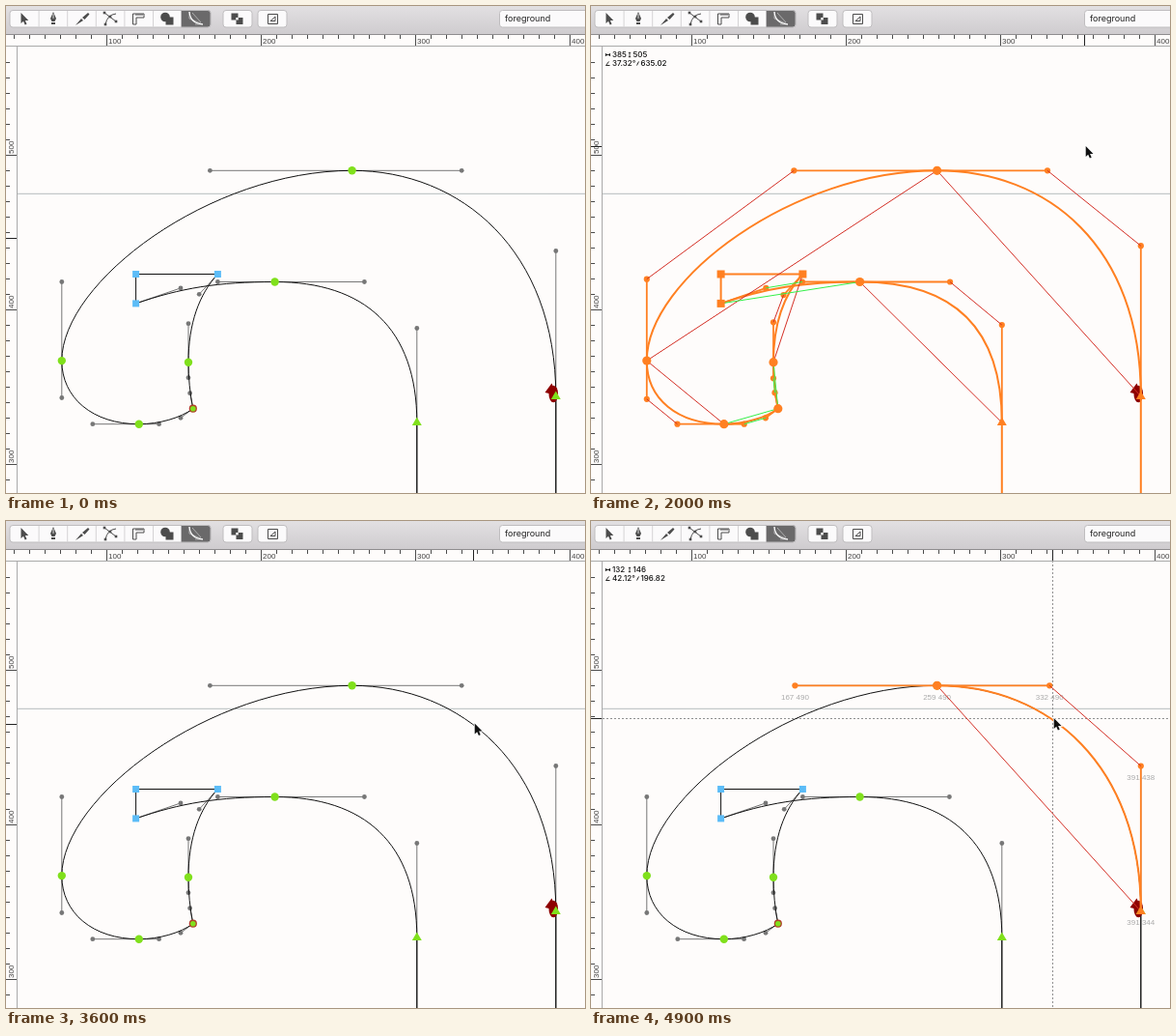
Recreate the animation shown at these times as an HTML page with a canvas. Size 600 px wide and 504 px high, loop 5000 ms.

```html
<!DOCTYPE html>
<html lang="en">
<head>
<meta charset="utf-8">
<title>Curve editing</title>
<style>
html, body { margin: 0; width: 100%; height: 100%; overflow: hidden; background: #fefcfb; }
canvas { display: block; }
</style>
</head>
<body>
<canvas id="stage" width="600" height="504"></canvas>
<script>
const ctx = document.getElementById('stage').getContext('2d');
const W = 600, H = 504, LOOP = 5000, STEP = 100, TAU = Math.PI * 2;
const PAPER = '#fefcfb', INK = '#4c4c4c';
const ORANGE = '#ff8022', RED = '#d42f25', LIME = '#35f04a', GREEN = '#80e01c', BLUE = '#5cbcf7';
const SMALL = '8px "Liberation Sans", Arial, sans-serif';
const UI = 'Inter, "Liberation Sans", sans-serif';

// Glyph units to pixels
const ZOOM = 1.6;
const X = u => u * ZOOM - 55.8;
const Y = v => (490 - v) * ZOOM + 170.3;
const P = (u, v) => [X(u), Y(v)];
const snap = n => Math.floor(n) + 0.5;

const START = P(391, 344), TOP = P(259, 490), LEFT = P(71, 367), LOW = P(121, 326);
const TIP = P(156, 336), INNER = P(153, 366), ARCH = P(209, 418), STEM = P(301, 327);
const CORNERS = [P(172, 423), P(119, 423), P(119, 404)];
const ROUND = [TOP, LEFT, LOW, INNER, ARCH];

// Curve from a point with a horizontal handle to one with a vertical handle
function quarter(a, b, la, lb) {
  const sx = Math.sign(b[0] - a[0]) * ZOOM, sy = Math.sign(a[1] - b[1]) * ZOOM;
  return { pts: [a, [a[0] + sx * la, a[1]], [b[0], b[1] + sy * lb], b], tint: RED };
}
const free = (a, b, c, d, tint) => ({ pts: [a, b, c, d], tint });

const CURVES = [
  quarter(TOP, START, 71, 94),
  quarter(TOP, LEFT, 92, 51),
  quarter(LOW, LEFT, 30, 24),
  quarter(ARCH, STEM, 58, 61),
  free(LOW, P(134, 326), P(148, 330), TIP, LIME),
  free(TIP, P(154, 346), P(153, 356), INNER, LIME),
  free(INNER, P(153, 391), P(160, 410), CORNERS[0], RED),
  free(CORNERS[2], P(148, 414), P(172, 418), ARCH, LIME)
];

// Pointer stops, eased in between
const STOPS = [
  { t: 0, at: [606, 240] },
  { t: 700, at: [565, 404] },
  { t: 900, at: [513, 200] },
  { t: 1500, at: [507, 168] },
  { t: 2500, at: [516, 123] },
  { t: 3600, at: [484.5, 210] },
  { t: 4200, at: [475, 205] },
  { t: 4900, at: [478.5, 204.5] }
];
const PULL = STOPS[3], TUG = STOPS[6];
const ease = k => k * k * (3 - 2 * k);

function pointer(t) {
  const i = STOPS.findIndex(s => s.t >= t);
  if (i < 1) return STOPS[i < 0 ? STOPS.length - 1 : 0].at;
  const a = STOPS[i - 1], b = STOPS[i], k = ease((t - a.t) / (b.t - a.t));
  return a.at.map((n, j) => n + (b.at[j] - n) * k);
}

function line(pts, color, width = 1) {
  ctx.beginPath();
  pts.forEach(p => ctx.lineTo(...p));
  ctx.strokeStyle = color;
  ctx.lineWidth = width;
  ctx.stroke();
}

function dot([x, y], r, fill) {
  ctx.beginPath();
  ctx.arc(x, y, r, 0, TAU);
  ctx.fillStyle = fill;
  ctx.fill();
}

function square([x, y], size, fill) {
  ctx.fillStyle = fill;
  ctx.fillRect(x - size / 2, y - size / 2, size, size);
}

function fillPath(d, color) {
  ctx.fillStyle = color;
  ctx.fill(new Path2D(d));
}

function strokePath(d, color, width = 1) {
  ctx.strokeStyle = color;
  ctx.lineWidth = width;
  ctx.stroke(new Path2D(d));
}

const triangle = ([x, y], fill) => fillPath(`M${x - 5} ${y + 3}l5 -8.5l5 8.5z`, fill);

function text(str, x, y, font, color, align = 'left') {
  ctx.font = font;
  ctx.fillStyle = color;
  ctx.textAlign = align;
  ctx.fillText(str, x, y);
}

function bezier([a, b, c, d], color, width) {
  ctx.beginPath();
  ctx.moveTo(...a);
  ctx.bezierCurveTo(...b, ...c, ...d);
  ctx.strokeStyle = color;
  ctx.lineWidth = width;
  ctx.stroke();
}

function box(x, w, fill = '#fbfafb', r = 3) {
  ctx.beginPath();
  ctx.roundRect(x, 4.5, w, 17.5, r);
  ctx.fillStyle = fill;
  ctx.fill();
  ctx.strokeStyle = '#bfbdbf';
  ctx.lineWidth = 1;
  ctx.stroke();
}

function arrow(x, y, fill, edge) {
  const d = `M${x} ${y}v11l2.5 -2.2l1.7 3.8l1.8 -.8l-1.6 -3.8h3.4z`;
  if (edge) strokePath(d, edge, 1.6);
  fillPath(d, fill);
}

function icons() {
  arrow(15.5, 7, INK);
  // pen and knife
  fillPath('M49 6l3 7l-1.5 3h-3l-1.5 -3zM47 17h4v2h-4z', INK);
  strokePath('M49 8v5', '#fff', 0.8);
  fillPath('M72 20l6 -7l2 2zM79 12l6 -5l1.5 1.5l-5 5.5z', INK);
  // points and ruler
  strokePath('M103 19q2 -10 11 -11M102 7l12 9', INK);
  for (const p of [[102, 7], [108, 11], [114, 16], [103, 19]]) square(p, 2.6, INK);
  strokePath('M131.5 19v-11h11.5v4h-8v7zM135 8v2M137 8v2M139 8v2M141 8v2', INK);
  // union and active tool
  dot([165, 11.5], 4.8, INK);
  square([169.5, 15.5], 8, INK);
  strokePath('M190 6v7l14 6h-8M193 7l9 10', '#ccc', 0.7);
  strokePath('M190 6q1 12 14 13', '#fff', 1.2);
  // overlap and export
  square([237, 11], 7, INK);
  square([242, 15.5], 7, INK);
  square([239.5, 13.2], 2.5, '#fff');
  strokePath('M271.5 8.5h10v10h-10zM274 15.5h5v-4.5z', INK);
}

function toolbar() {
  const g = ctx.createLinearGradient(0, 0, 0, 29);
  g.addColorStop(0, '#e2e0e2');
  g.addColorStop(1, '#cfcccf');
  ctx.fillStyle = g;
  ctx.fillRect(0, 0, W, 29);
  ctx.fillStyle = '#8f8d8f';
  ctx.fillRect(0, 29, W, 1);
  box(4, 208);
  for (let i = 1; i < 6; i++) line([[4.5 + i * 29.6, 5], [4.5 + i * 29.6, 22]], '#d5d3d5');
  box(181.5, 30.5, '#6a696a', [0, 3, 3, 0]);
  box(225, 30);
  box(261, 30);
  box(511.5, 100);
  text('foreground', 517, 16.3, '9px ' + UI, '#222');
  icons();
}

function rulers([x, y]) {
  ctx.fillStyle = PAPER;
  ctx.fillRect(0, 30, W, 11);
  ctx.fillRect(0, 30, 11, H);
  line([[0, 41.5], [W, 41.5]], '#aaa');
  line([[11.5, 41], [11.5, H]], '#aaa');
  for (let u = 40; u < 580; u += 10) {
    const major = u % 100 === 0, px = snap(X(u)), py = snap(Y(u));
    line([[px, 30], [px, major ? 41 : 34]], INK);
    if (major) text(u, px + 1.5, 39, SMALL, '#444');
    if (py < 44) continue;
    line([[0, py], [major ? 11 : 4, py]], INK);
    if (!major) continue;
    ctx.save();
    ctx.translate(8, py - 1.5);
    ctx.rotate(-TAU / 4);
    text(u, 0, 0, SMALL, '#444');
    ctx.restore();
  }
  line([[snap(x), 30], [snap(x), 41]], '#222');
  line([[0, snap(y)], [11, snap(y)]], '#222');
}

// Dragging scales horizontal handles by dx and vertical ones by dy
function stretch(on, off, dx, dy) {
  const vx = off[0] - on[0], vy = off[1] - on[1];
  const k = 1 + 0.0075 * (Math.abs(vx) > Math.abs(vy) ? dx : dy);
  return [on[0] + vx * k, on[1] + vy * k];
}

function pulled({ pts: [a, b, c, d], tint }, dx, dy) {
  return free(a, stretch(a, b, dx, dy), stretch(d, c, dx, dy), d, tint);
}

function handles({ pts: [a, b, c, d] }, color, width, r) {
  line([a, b], color, width);
  line([c, d], color, width);
  dot(b, r, color);
  dot(c, r, color);
}

function tension({ pts: [a, b, c, d], tint }) {
  line([a, d], tint);
  line([b, c], tint);
}

function startMark() {
  fillPath('M565.5 390.5l-7 9.5l12.5 3z', '#8e0000');
  ctx.beginPath();
  ctx.ellipse(567.3, 401.5, 4.8, 8.7, 0, 0, TAU);
  ctx.fill();
}

function outline(curves, color, width) {
  curves.forEach(c => bezier(c.pts, color, width));
  line(CORNERS, color, width);
  for (const p of [STEM, START]) line([p, [p[0], H]], color, Math.max(width, 1.4));
}

function plain(curves) {
  curves.forEach(c => handles(c, '#777', 1, 2.4));
  outline(curves, '#111', 1);
  startMark();
  ROUND.forEach(p => dot(p, 4.2, GREEN));
  dot(TIP, 4.1, '#b0402a');
  dot(TIP, 2.8, GREEN);
  CORNERS.forEach(p => square(p, 7, BLUE));
  triangle(STEM, GREEN);
  triangle(START, GREEN);
}

function selected(curves) {
  startMark();
  outline(curves, ORANGE, 2);
  curves.forEach(c => handles(c, ORANGE, 1.8, 3.1));
  curves.forEach(tension);
  [...ROUND, TIP].forEach(p => dot(p, 4.6, ORANGE));
  CORNERS.forEach(p => square(p, 8, ORANGE));
  triangle(STEM, ORANGE);
  triangle(START, ORANGE);
}

function label([x, y]) {
  const u = Math.round((x - X(0)) / ZOOM), v = Math.round((Y(0) - y) / ZOOM);
  text(u + ' ' + v, x, y + 14.5, SMALL, '#aaa', 'center');
}

function segment(curves) {
  const [arc, next] = curves, back = next.pts[1];
  plain(curves);
  [...arc.pts, back].forEach(label);
  bezier(arc.pts, ORANGE, 2);
  handles(arc, ORANGE, 1.8, 3.1);
  line([TOP, back], ORANGE, 1.8);
  dot(back, 3.1, ORANGE);
  tension(arc);
  dot(TOP, 4.6, ORANGE);
  triangle(START, ORANGE);
}

function info(w, h, angle, length) {
  const put = (s, x, y) => text(s, x, y, '500 8px ' + UI, '#111');
  strokePath('M15 50.5h5M15.5 49v3M19.5 49v3', '#111', 0.9);
  strokePath('M40 48v5M38.8 48.3h2.4M38.8 52.7h2.4', '#111', 0.8);
  strokePath('M18.5 57.5l-3 4h4M49.5 57.5l-2 4', '#111', 0.9);
  put(w, 22, 53);
  put(h, 43.5, 53);
  put(angle + '°', 22, 62);
  put(length, 51.5, 62);
}

function crosshair([x, y]) {
  ctx.setLineDash([2, 2]);
  line([[snap(x), 41], [snap(x), H]], '#909090');
  line([[12, snap(y)], [W, snap(y)]], '#909090');
  ctx.setLineDash([]);
}

function burst([x, y]) {
  for (let a = 0; a < TAU; a += TAU / 12) {
    const ray = r => [x + Math.cos(a) * r, y + Math.sin(a) * r];
    line([ray(2), ray(7.5)], '#aaa', 1.3);
  }
}

function render(t) {
  const at = pointer(t), within = (a, b) => t >= a && t < b;
  const all = within(1400, 2700), one = t >= 3900;
  const down = within(1400, 1800) || within(3900, 4100) || t >= 4300;

  let dx = 0, dy = 0;
  if (within(1500, 2200)) {
    const [px, py] = pointer(Math.min(t, 1700));
    dx = px - PULL.at[0];
    dy = PULL.at[1] - py;
  } else if (t > TUG.t) dx = at[0] - TUG.at[0];

  const curves = CURVES.map((c, i) => all || (one && i === 0) ? pulled(c, dx, dy) : c);

  ctx.fillStyle = PAPER;
  ctx.fillRect(0, 0, W, H);
  line([[12, Y(475)], [W, Y(475)]], '#b5bcbd');
  if (down) crosshair(at);
  if (all) selected(curves);
  else if (one) segment(curves);
  else plain(curves);
  if (all && down) {
    line([at, [473, 202]], '#f0a878');
    if (t < 1700) burst(at);
  }
  if (within(1800, 2700)) info('385', '505', '37.32', '635.02');
  if (t >= 4100) info('132', '146', '42.12', '196.82');
  rulers(at);
  toolbar();
  arrow(at[0] + 1.2, at[1] - 0.5, '#111', '#fff');
}

function tick() {
  const t = performance.now() % LOOP;
  render(Math.floor(t / STEP) * STEP);
  requestAnimationFrame(tick);
}
tick();
</script>
</body>
</html>
```
